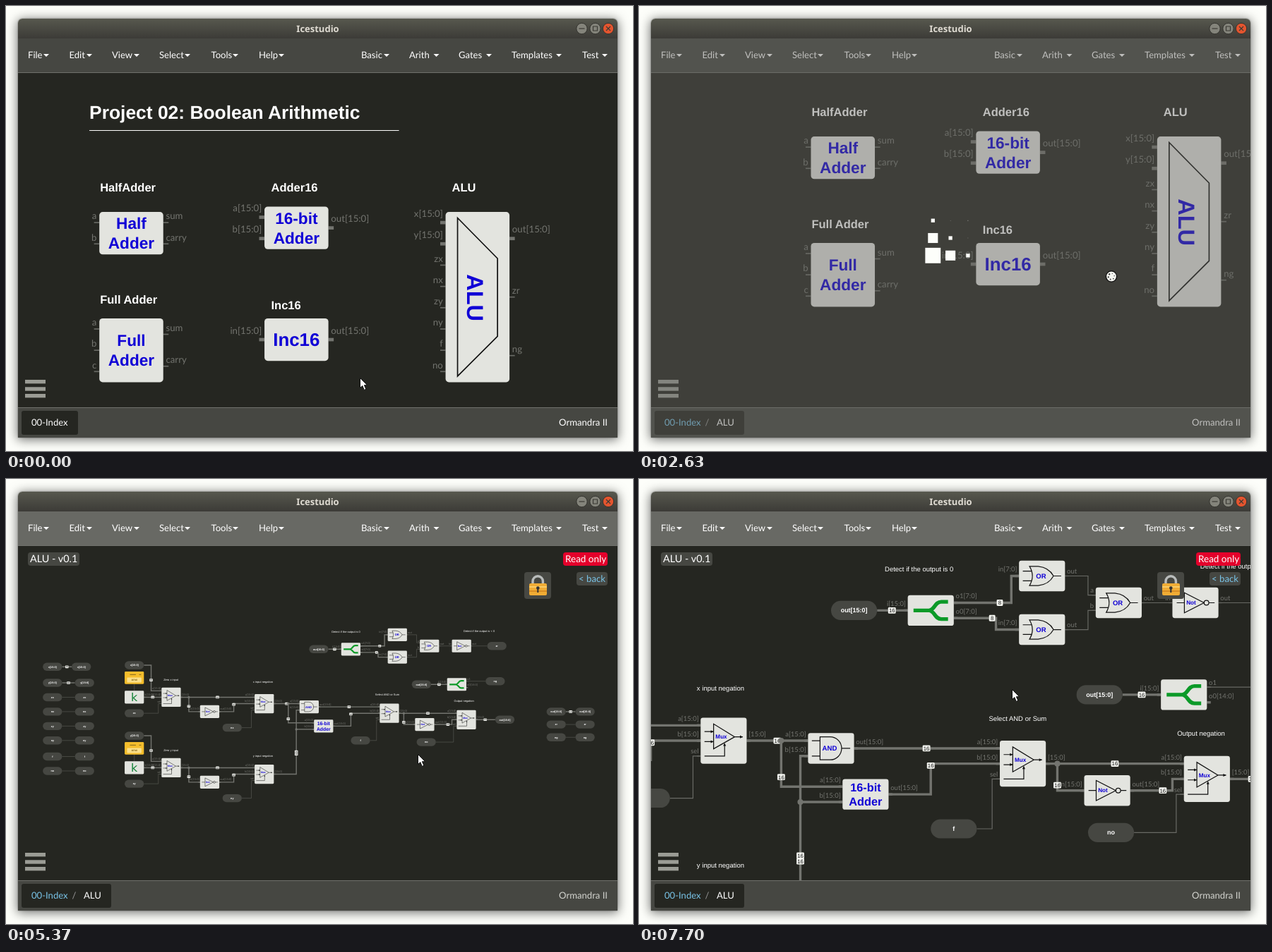
An HTML page that plays this animation: 888x631 px, repeating every 8000 ms.

```html
<!DOCTYPE html>
<html lang="en">
<head>
<meta charset="utf-8">
<title>Icestudio</title>
<style>
html, body { margin: 0; width: 100%; height: 100%; overflow: hidden; background: #fdfefa; }
#window { position: absolute; left: 17px; top: 18px; width: 849px; height: 594px; border-radius: 6px 6px 0 0;
  box-shadow: 0 2px 15px 1px rgba(0,0,0,.55), 0 0 2px rgba(0,0,0,.5); }
svg { position: absolute; left: 0; top: 0; display: block; }
text { font: 13.1px Lato, sans-serif; fill: #fff; text-rendering: geometricPrecision; white-space: pre; }
.port { font-size: 14px; fill: #73746f; }
.head { font: bold 17.5px "Liberation Sans", sans-serif; }
.note { font: 14px "Liberation Sans", sans-serif; }
.pill { font: bold 13.2px "Liberation Sans", sans-serif; text-anchor: middle; }
.name { font: bold 12px "Liberation Sans", sans-serif; fill: #1000d6; text-anchor: middle; }
.block { fill: #e3e4df; }
.icon { fill: none; stroke: #111; stroke-width: 1.8; }
.split { fill: none; stroke: #0c9a28; stroke-width: 8; }
.wire, .stub { fill: none; stroke: #686964; stroke-width: 1.8; }
.wide, .on .wire { stroke: #73746f; stroke-width: 5; }
.tag { display: none; }
.on .tag { display: block; }
.tag rect { fill: #f4f5f0; }
.tag text { font: 11.5px "Liberation Sans", sans-serif; fill: #111; text-anchor: middle; }
.joint { fill: #73746f; }
.blue { fill: #79c4e8; }
</style>
</head>
<body>
<div id="window"></div>
<svg id="stage" width="888" height="631" viewBox="0 0 888 631"></svg>
<script>
const rect = (x, y, w, h, fill, rx = 0, more = '') =>
  `<rect x="${x}" y="${y}" width="${w}" height="${h}" rx="${rx}" fill="${fill}" ${more}/>`;
const text = (x, y, s, cls = '', more = '') =>
  `<text x="${x}" y="${y}" class="${cls}" ${more}>${s.replace('<', '&lt;')}</text>`;
const path = (d, cls, more = '') => `<path d="${d}" class="${cls}" ${more}/>`;
const size = n => `style="font-size:${n}px"`;
const lines = (rows, px, cy, step = px * 1.27) => rows.map((s, i) =>
  text(48, cy + px * .36 + (i - (rows.length - 1) / 2) * step, s, 'name', size(px))).join('');

const arrow = (x, y, turn = 0) =>
  `<path d="M0 0l-6-3v6z" fill="#111" transform="translate(${x} ${y}) rotate(${turn})"/>`;
const orIcon = path('M22 12Q34 32 22 52H40Q62 50 72 32Q62 14 40 12ZM8 22H27M8 42H27M72 32H88', 'icon') +
  text(46, 37, 'OR', 'name', size(14));
const notIcon = path('M25 11V53L66 32ZM9 32H25M76 32H88M76 32a5 5 0 1 0-10 0a5 5 0 1 0 10 0', 'icon') +
  text(39, 36, 'Not', 'name');
const splitIcon = path('M12 32H46M44 32C56 32 56 14 70 14H84M44 32C56 32 56 50 70 50H84', 'split');

// Each kind: height, inputs and outputs as "name@y", drawing
const kinds = {
  mux: [96, 'a[15:0]@16 b[15:0]@48 sel@80', '[15:0]@48',
    path('M27 13V65L71 40ZM71 40H88M8 29H27M8 50H27M8 80H50V54', 'icon') + arrow(88, 40) +
    arrow(27, 29) + arrow(27, 50) + arrow(50, 53, -90) + text(43, 44, 'Mux', 'name')],
  and: [64, 'a[15:0]@16 b[15:0]@48', 'out[15:0]@32',
    path('M25 8H46a24 24 0 0 1 0 48H25ZM8 16H25M8 48H25M70 32H88', 'icon') +
    text(45, 37, 'AND', 'name', size(14.2))],
  add: [64, 'a[15:0]@16 b[15:0]@48', 'out[15:0]@32', lines(['16-bit', 'Adder'], 24, 32, 30)],
  not16: [64, 'in[15:0]@32', 'out[15:0]@32', notIcon],
  not: [64, 'in@32', 'out@32', notIcon],
  or8: [64, 'in[7:0]@32', 'out@32', orIcon],
  or: [64, 'a@16 b@48', 'out@32', orIcon],
  split8: [64, 'i[15:0]@32', 'o1[7:0]@16 o0[7:0]@48', splitIcon],
  split1: [64, 'i[15:0]@32', 'o1@16 o0[14:0]@48', splitIcon],
  k: [64, '', 'k[15:0]@32', '<text x="48" y="52" text-anchor="middle" style="font:56px DejaVu Sans,sans-serif;fill:#148238">k</text>'],
  half: [64, 'a@16 b@48', 'sum@16 carry@48', lines(['Half', 'Adder'], 24, 32, 30)],
  full: [96, 'a@16 b@48 c@80', 'sum@24 carry@72', lines(['Full', 'Adder'], 24, 48, 30)],
  inc: [64, 'in[15:0]@32', 'out[15:0]@32', lines(['Inc16'], 27.4, 32)],
  alu: [256, 'x[15:0]@16 y[15:0]@48 zx@80 nx@112 zy@144 ny@176 f@208 no@240', 'out[15:0]@40 zr@128 ng@216',
    path('M18 9L78 70V187L18 247Z', 'icon') +
    `<g transform="translate(44 129) rotate(90)">${text(0, 12, 'ALU', 'name', size(34.6))}</g>`]
};

function block(kind, x, y) {
  const [h, ins, outs, icon] = kinds[kind];
  const ports = (list, out) => list.split(' ').filter(Boolean).map(p => {
    const [name, at] = p.split('@'), bus = name.includes('[');
    return path(`M${out ? 96 : -8} ${at}h8`, bus ? 'stub wide' : 'stub') +
      text(out ? 100 : -4, at - (bus ? 9 : 5), name, 'port', out ? '' : 'text-anchor="end"');
  }).join('');
  return `<g transform="translate(${x} ${y})">${ports(ins)}${ports(outs, true)}` +
    `<rect width="96" height="${h}" rx="5" class="block"/>${icon}</g>`;
}
const pill = (x, cy, s) => rect(x, cy - 20, 96, 40, '#464742', 20) + text(x + 48, cy + 4.5, s, 'pill');
const thin = d => path(d, 'wire');
const joint = (x, y) => `<circle cx="${x}" cy="${y}" r="6" class="joint"/>`;

// A bus gets thick, with its width shown, at a given time
function bus(d, x, y, at, bits = '16') {
  at = at ?? (x > -24 && x < 900 ? 3570 : 3430);
  const w = bits.length > 1 ? 16 : 13;
  return `<g class="bus" data-at="${at}">${path(d, 'wire')}<g class="tag">` +
    rect(x - w / 2, y - 6.5, w, 13, '', 2) + text(x, y + 4.2, bits) + '</g></g>';
}

const inputStage = (v, dy) => `<g transform="translate(0 ${dy})">` +
  bus('M-776-176H-740V-48H-688', -740, -102, 0) + bus('M-776-16H-688', -732, -16) +
  thin('M-824-84V-48M-776 64H-704V16H-688M-288 136H-240V48H-224') +
  bus('M-592-16H-224', -409, -16) + bus('M-552-16V56H-496', -552, 29) +
  bus('M-400 56H-328V16H-224', -328, 20) + joint(-552, -16) +
  rect(-872, -144, 96, 62, '#f4bd2c', 5) + rect(-860, -114, 72, 24, '#fbe08a', 3) +
  text(-824, -98, "16'h0", 'name', 'style="fill:#7a5a10"') + path('M-846-129h30m16 0h10', 'icon') +
  block('k', -872, -48) + block('mux', -688, -64) + block('not16', -496, 24) + block('mux', -224, -32) +
  pill(-872, -176, v + '[15:0]') + pill(-872, 64, 'z' + v) + pill(-384, 136, 'n' + v) +
  text(-678, -100, `Zero ${v} input`, 'note') + '</g>';

const leftPins = [['x[15:0]', -168, -1136], ['y[15:0]', -88], ['zx', -16], ['nx', 56], ['zy', 128],
  ['ny', 200], ['f', 280], ['no', 352]];
const rightPins = [['out[15:0]', 56], ['zr', 120], ['ng', 184]];
const pinPair = (s, y, left, right) => {
  const d = `M${left + 96} ${y}H${right}`;
  return (s.includes('[') ? bus(d, (left + 96 + right) / 2, y) : thin(d)) + pill(left, y, s) + pill(right, y, s);
};

const circuit =
  leftPins.map(([s, y, right = -1120]) => pinPair(s, y, -1280, right)).join('') +
  rightPins.map(([s, y]) => pinPair(s, y, 1232, 1376)).join('') +
  thin('M352 200H384V96H400M680 208H768V128H784M536-328H584V-288H600M536-216H584V-256H600' +
    'M696-272H760M856-272H936M832-96H928') +
  bus('M-128 16H0', -64, 16) + bus('M-56 16V112H72', -56, 92) +
  bus('M-128 368H-16V48H0', -16, 256) + bus('M-16 144H72', -16, 268) +
  bus('M96 32H400', 247, 32) + bus('M168 128H256V64H400', 256, 68) +
  bus('M496 64H784', 640, 64) + bus('M520 64V120H576', 520, 109) +
  bus('M672 120H760V96H784', 740, 120) + bus('M880 96H976', 926, 96, 0) +
  bus('M144-256H208', 175, -256) + bus('M656-80H736', 696, -80) +
  bus('M304-272H424V-328H440', 400, -272, 3570, '8') + bus('M304-240H392V-216H440', 384, -240, 3570, '8') +
  joint(-56, 16) + joint(-16, 144) + joint(520, 64) +
  inputStage('x', 0) + inputStage('y', 352) +
  [['and', 0, 0], ['add', 72, 96], ['mux', 400, 16], ['not16', 576, 88], ['mux', 784, 48],
   ['split8', 208, -288], ['or8', 440, -360], ['or8', 440, -248], ['or', 600, -304],
   ['not', 760, -304], ['split1', 736, -112]].map(b => block(...b)).join('') +
  [[48, -256, 'out[15:0]'], [560, -80, 'out[15:0]'], [256, 200, 'f'], [584, 208, 'no'],
   [936, -272, 'zr'], [928, -96, 'ng'], [976, 96, 'out[15:0]']].map(p => pill(...p)).join('') +
  [[-232, -88, 'x input negation'], [-232, 281, 'y input negation'], [377, -25, 'Select AND or Sum'],
   [770, 6, 'Output negation'], [160, -338, 'Detect if the output is 0'],
   [818, -343, 'Detect if the output is < 0']].map(n => text(...n, 'note')).join('');

const index =
  text(-15, -140, 'Project 02: Boolean Arithmetic', 'head', size(28)) + rect(-15, -123, 465, 1.06, '#fff') +
  [[1, -31, 'HalfAdder'], [258, -31, 'Adder16'], [529.5, -31, 'ALU'], [1, 138, 'Full Adder'],
   [258, 146, 'Inc16']].map(h => text(...h, 'head')).join('') +
  [['half', 0, 0], ['add', 248, -8], ['alu', 520, 0], ['full', 0, 160], ['inc', 248, 160]]
    .map(b => block(...b)).join('');

const menu = [['File', 31, 53], ['Edit', 89.5, 114], ['View', 150, 181], ['Select', 217, 253], ['Tools', 290.5, 321],
  ['Help', 358, 386], ['Basic', 503, 535], ['Arith', 571, 605.5], ['Gates', 641, 680],
  ['Templates', 716, 779], ['Test', 816, 844]];

const button = (x, fill, mark) => `<circle cx="${x}" cy="32" r="7.7" fill="${fill}" stroke="#33332e"/>` +
  path(`M${x} 32${mark}`, '', 'fill="none" stroke="#3b3a35" stroke-width="1.2"');

const lock = rect(734, 132, 38, 38, '#474843', 4) +
  path('M746 150V145a7.2 7.2 0 0 1 14.4 0V150', '', 'fill="none" stroke="#b9bcbb" stroke-width="3.4"') +
  rect(741, 148, 25, 17, '#f0ac35', 2) + rect(741, 152, 25, 2, '#f9cc68') + rect(741, 158, 25, 2, '#d98d24') +
  '<circle cx="753.3" cy="154.5" r="2.3" fill="#333"/>' + rect(752.3, 155, 2, 6, '#333');

const cubes = Array.from({ length: 9 }, () => '<rect class="cube" fill="#fdfefa"/>').join('');
const dots = [0, 1, 2, 3, 4, 5].map(i =>
  `<circle r="${.6 + i * .12}" cx="4.3" fill="#333" transform="rotate(${i * 60})"/>`).join('');

document.getElementById('stage').innerHTML =
  `<defs><linearGradient id="bar" x2="0" y2="1"><stop stop-color="#57584e"/><stop offset="1" stop-color="#3c3b37"/></linearGradient>
   <clipPath id="view"><rect x="17" y="95" width="849" height="474"/></clipPath></defs>` +
  path('M17 46V24a6 6 0 0 1 6-6H860a6 6 0 0 1 6 6V46Z', '', 'fill="url(#bar)"') +
  '<text x="441.5" y="36.5" text-anchor="middle" style="font:bold 13px Noto Sans,sans-serif;fill:#dfdbd2">Icestudio</text>' +
  button(815.5, '#84847b', 'm-4 0h8') + button(834.5, '#84847b', 'm-3-3h6v6h-6z') +
  button(853, '#e4552f', 'm-3-3l6 6m0-6l-6 6') +
  rect(17, 46, 849, 48, '#464742', 0, 'id="menubar"') + rect(17, 94, 849, 1, '#70716c') +
  menu.map(([s, x, caret]) => text(x, 73.5, s) + path(`M${caret} 68h8l-4 4z`, '', 'fill="#fff"')).join('') +
  rect(17, 95, 849, 474, '#252621') +
  `<g clip-path="url(#view)"><g id="index">${index}</g><g id="circuit">${circuit}</g></g>` +
  `<g id="hud">${rect(31, 104, 73, 19, '#464742', 4)}${text(34, 118, 'ALU - v0.1', '', size(14.4))}` +
  rect(789, 104, 63, 19, '#e4002b', 4) + text(792, 117.5, 'Read only', '', size(13.5)) +
  rect(808, 132, 44, 19, '#464742', 4) + text(811, 146, '< back', 'blue', size(13.2)) + lock + '</g>' +
  [530, 540.3, 550].map(y => rect(27, y, 29, 5.4, '#9b9c95')).join('') +
  rect(17, 569, 849, 43, '#464742') + rect(17, 569, 849, 1, '#70716c') +
  rect(22, 574, 80, 34, '#252621', 3, 'id="tab"') + text(36, 595, '00-Index', '', 'id="home"') +
  `<g id="crumb">${text(93.5, 595, '/', '', 'style="fill:#999"')}${text(110, 595, 'ALU')}</g>` +
  text(852, 595, 'Ormandra II', '', 'id="board" text-anchor="end"') +
  `<g id="wait">${rect(17, 46, 849, 566, '#64655f', 0, 'opacity=".41"')}${cubes}</g>` +
  `<g id="busy" transform="translate(669 383.5)"><circle r="7.6" fill="#f4f5f0" stroke="#111" stroke-width="1.4"/><g id="dots">${dots}</g></g>` +
  path('M.5.5V14.6L3.8 11.6L6.3 17.4L8.9 16.3L6.4 10.7H10.6Z', '',
    'id="cursor" fill="#fff" stroke="#111" stroke-width="1"');

const $ = id => document.getElementById(id);
const show = (el, on) => { el.style.display = on ? '' : 'none'; };
const LOOP = 8000, WAIT = 1830, OPEN = 2430, READY = 3370, TICK = 200 / 3;

const smooth = p => p * p * (3 - 2 * p);
const moves = [[0, 501, 527],
  ...Array.from({ length: 9 }, (_, i) => {
    const p = smooth((i + 1) / 9);
    return [500 + i * 100, 501 + 164 * p, 527 - 148 * p];
  }),
  [READY, 620, 378], [3570, 621, 405], [4030, 620, 405], [4300, 621, 408], [5370, 583, 390],
  [5570, 562, 362], [5670, 531, 331], [5770, 541, 316], [5970, 546, 289], [6100, 551, 267],
  [7230, 546, 275], [7300, 538, 286], [7370, 531, 295], [7430, 528, 298]];
// time, scale, x, y
const zooms = [[0, .284, 415.7, 314], [6500, .353, 382.7, 324.8], [6970, .439, 341.5, 338.5],
  [7570, .546, 296, 348], [7700, .679, 239.4, 360.2]];
const stepAt = (table, t) => table.filter(row => row[0] <= t).pop();

// Cubic ease-in-out close to the CSS curve (.42, 0, .58, 1)
function easeInOut(p) {
  let u = p;
  for (let i = 0; i < 6; i++) {
    const x = 1.26 * u * (1 - u) ** 2 + 1.74 * u * u * (1 - u) + u ** 3;
    u += (p - x) * .8;
  }
  return smooth(u);
}
function cubeScale(ms) {
  if (ms < 0) return 1;
  const p = ms % 1300 / 455;
  return p < 1 ? 1 - easeInOut(p) : p < 2 ? easeInOut(p - 1) : 1;
}

const buses = [...document.querySelectorAll('.bus')], cubeEls = [...document.querySelectorAll('.cube')];

function render(t) {
  const ready = t >= READY, opened = t >= OPEN, waiting = t >= WAIT && !ready;
  show($('index'), !ready);
  show($('circuit'), ready);
  show($('hud'), ready);
  show($('wait'), waiting);
  show($('crumb'), opened);
  show($('busy'), waiting && opened);
  show($('cursor'), !waiting);
  $('menubar').setAttribute('fill', ready ? '#686964' : '#464742');
  $('tab').setAttribute('width', opened ? 127 : 80);
  $('home').setAttribute('class', opened ? 'blue' : '');
  $('board').style.fill = ready ? '#d2d3ce' : '#fff';

  $('index').setAttribute('transform', `translate(${opened ? '243.5 185' : '132.2 292'}) scale(.943)`);
  const [, scale, zx, zy] = stepAt(zooms, t);
  $('circuit').setAttribute('transform', `translate(${zx} ${zy}) scale(${scale})`);
  buses.forEach(b => b.classList.toggle('on', t >= +b.dataset.at));

  const [, x, y] = stepAt(moves, t);
  $('cursor').setAttribute('transform', `translate(${x} ${y})`);

  if (!waiting) return;
  const ms = Math.floor((t - WAIT) / TICK + .02) * TICK;
  $('dots').setAttribute('transform', `rotate(${ms * .36})`);
  cubeEls.forEach((c, i) => {
    const col = i % 3, row = Math.floor(i / 3);
    const w = 24.9 * cubeScale(ms - 100 * (col + 2 - row));
    c.setAttribute('x', 416.3 + col * 24.8 - w / 2);
    c.setAttribute('y', 304.2 + row * 24.8 - w / 2);
    c.setAttribute('width', w);
    c.setAttribute('height', w);
  });
}

const start = performance.now();
function frame() {
  render((performance.now() - start) % LOOP);
  requestAnimationFrame(frame);
}
frame();
</script>
</body>
</html>
```
